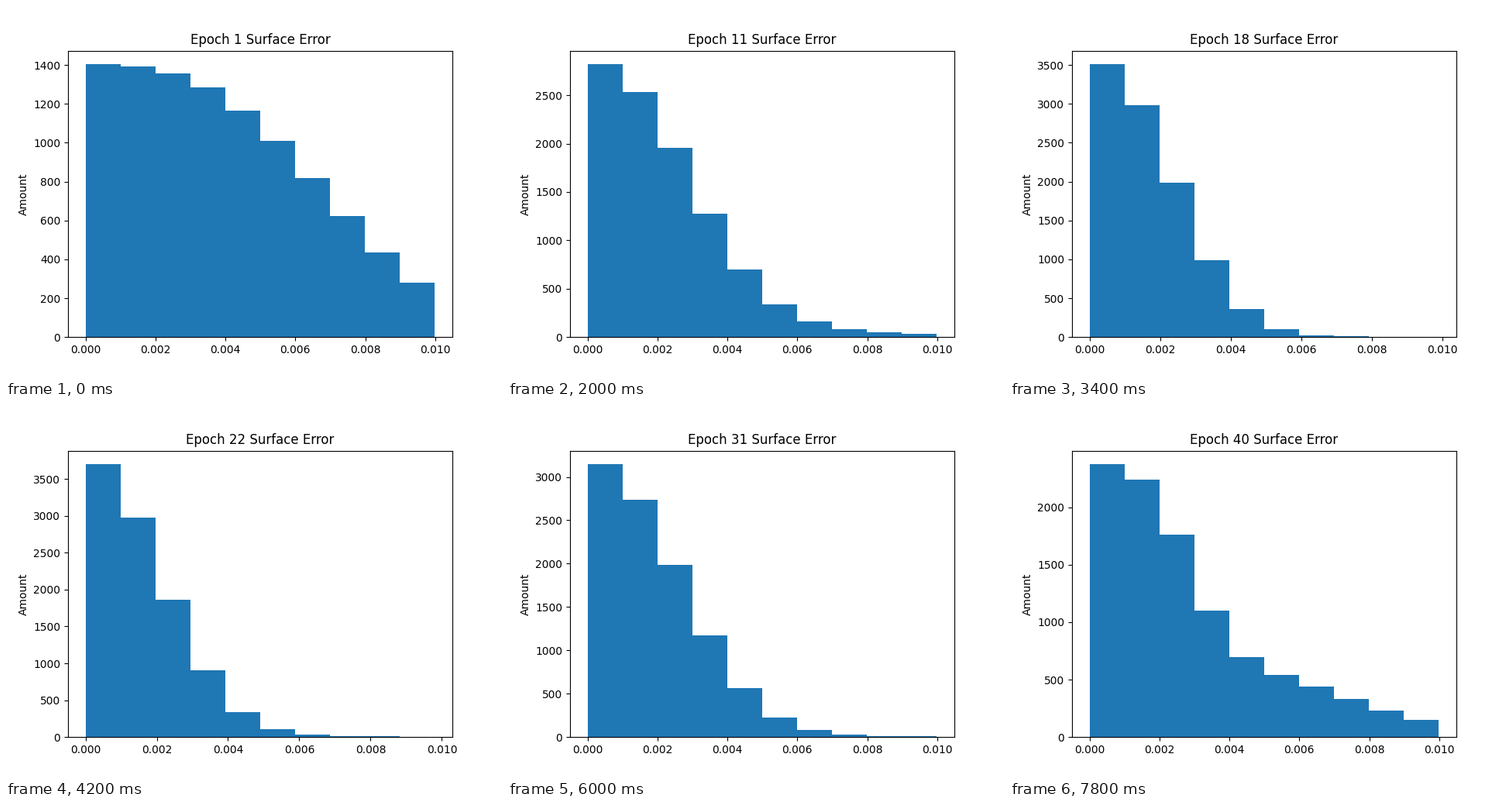
Recreate the animation shown at these times as a matplotlib script. Size 640 by 480 pixels, loop 8000 ms.

```python
import numpy as np
import matplotlib.pyplot as plt
from matplotlib.animation import FuncAnimation

EPOCHS = 40
BINS = 10
CUTOFF = 0.00999

# Key epochs: width and steepness of the narrow core (in bins),
# and the share of points still in the broad starting spread.
KEY_EPOCH = [1, 7, 14, 18, 26, 31, 40]
WIDTH = [3.98, 3.98, 3.53, 3.14, 2.72, 3.47, 3.18]
POWER = [2.4, 2.4, 2.25, 2.35, 1.87, 2.23, 3.3]
BROAD = [1, 0.17, 0.06, 0.012, 0.03, 0.03, 0.53]


def bump(width, power):
    """Bell-like share of points per bin, adding up to one."""
    mid = np.arange(BINS) + 0.5
    shape = np.exp(-(mid / width) ** power)
    return shape / shape.sum()


def counts_at(epoch):
    width, power, broad = (np.interp(epoch, KEY_EPOCH, keys)
                           for keys in (WIDTH, POWER, BROAD))
    points = 9970 - 200 * broad  # the broad spread loses some past the cutoff
    mix = (1 - broad) * bump(width, power) + broad * bump(8.05, 2.9)
    return np.round(points * mix)


def largest_error(epoch):
    """Every fourth epoch stops a little short of the cutoff."""
    if epoch % 4 != 2:
        return CUTOFF
    return CUTOFF - 1e-4 * (1.85 + 0.95 * np.cos(np.pi * (epoch - 26) / 8))


def draw(frame):
    epoch = frame + 1
    edges = np.linspace(0, largest_error(epoch), BINS + 1)
    centers = (edges[:-1] + edges[1:]) / 2
    ax.clear()
    ax.hist(centers, bins=edges, weights=counts_at(epoch))
    ax.set_title(f"Epoch {epoch} Surface Error")
    ax.set_ylabel("Amount")
    return ax.patches


fig, ax = plt.subplots(figsize=(6.4, 4.8), dpi=100)
anim = FuncAnimation(fig, draw, frames=EPOCHS, init_func=lambda: draw(0),
                     interval=200, repeat=True, repeat_delay=0)
plt.show()
```
